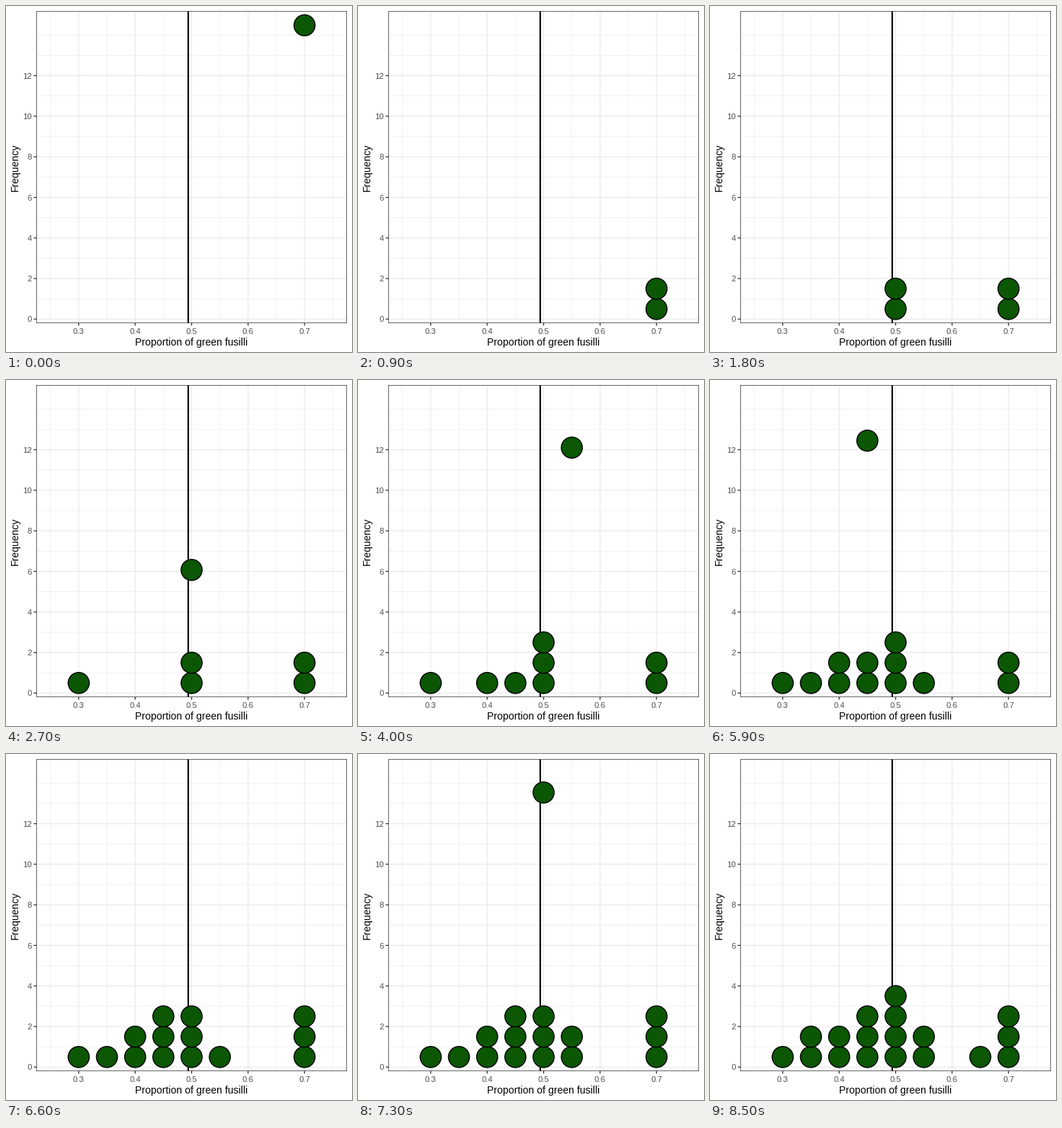
A matplotlib script that plays this animation: 480x480 px, repeating every 10 s.

```python
import matplotlib.pyplot as plt
from matplotlib.animation import FuncAnimation
from matplotlib.patches import Circle, Rectangle

SIZE, DPI = 480, 72          # at 72 dpi one point equals one pixel
FRAMES, INTERVAL = 100, 100
LEFT, RIGHT, TOP, BOTTOM = 42, 473, 7, 440
START_Y = 14.5
STEPS_PER_DROP = 10          # each dot falls for nine steps, then rests for one
SAMPLES = [0.70, 0.70, 0.50, 0.50, 0.30, 0.50, 0.40, 0.45, 0.55,
           0.40, 0.35, 0.45, 0.45, 0.70, 0.55, 0.50, 0.35, 0.65]

plt.rcParams["font.family"] = "Liberation Sans"


def px(x):
    return 257.5 + (x - 0.5) * 783.2


def py(y):
    return 434.4 - y * 28.15


fig = plt.figure(figsize=(SIZE / DPI, SIZE / DPI), dpi=DPI, facecolor="white")
ax = fig.add_axes([0, 0, 1, 1])
ax.set_xlim(0, SIZE)
ax.set_ylim(SIZE, 0)
ax.axis("off")


def line(x0, y0, x1, y1, color, width, z):
    ax.plot([x0, x1], [y0, y1], color=color, lw=width, zorder=z,
            solid_capstyle="butt", snap=False)


def vertical(x, color, width, z):
    line(px(x), TOP, px(x), BOTTOM, color, width, z)


def horizontal(y, color, width, z):
    line(LEFT, py(y), RIGHT, py(y), color, width, z)


GRID, DARK, LABEL = "#ebebeb", "#333333", "#4d4d4d"

for i in range(6):
    vertical(0.25 + 0.1 * i, GRID, 0.68, 1)
for y in [*range(1, 14, 2), 14]:
    horizontal(y, GRID, 0.68, 1)

for i in range(3, 8):
    x = i / 10
    vertical(x, GRID, 1.36, 2)
    line(px(x), BOTTOM, px(x), BOTTOM + 3.5, DARK, 1.36, 2)
    ax.text(px(x), 455, f"{x:.1f}", size=11.2, color=LABEL, ha="center", va="baseline")
for y in range(0, 13, 2):
    horizontal(y, GRID, 1.36, 2)
    line(LEFT - 3.5, py(y), LEFT, py(y), DARK, 1.36, 2)
    ax.text(35.6, py(y) + 4.1, str(y), size=11.2, color=LABEL, ha="right", va="baseline")

vertical(0.494, "black", 2.13, 3)
ax.add_patch(Rectangle((LEFT + 0.35, TOP + 0.35), RIGHT - LEFT - 0.7, BOTTOM - TOP - 0.7,
                       fill=False, ec=DARK, lw=0.75, zorder=30, snap=False))
ax.text(257.5, 471, "Proportion of green fusilli", size=14, ha="center", va="baseline")
ax.text(17.3, 223.5, "Frequency", size=14, rotation=90, ha="right", va="center")
ax.texts[-1].set(ha="center", va="center", position=(13, 223.5))

dots = []
for i, x in enumerate(SAMPLES):
    dot = Circle((px(x), py(START_Y)), 14.6, fc="#0b5703", ec="black", lw=1.4, zorder=4 + i)
    dot.rest = SAMPLES[:i].count(x) + 0.5
    dots.append(ax.add_patch(dot))


def update(frame):
    step = (21 * frame + 15) // 10
    for i, dot in enumerate(dots):
        elapsed = step - i * STEPS_PER_DROP
        fall = min(max(elapsed, 0) / 9, 1) ** 3
        dot.set_visible(elapsed > 0)
        dot.center = px(SAMPLES[i]), py(START_Y + (dot.rest - START_Y) * fall)
    return dots


anim = FuncAnimation(fig, update, frames=FRAMES, interval=INTERVAL,
                     repeat=True, repeat_delay=0, blit=False)
plt.show()
```
